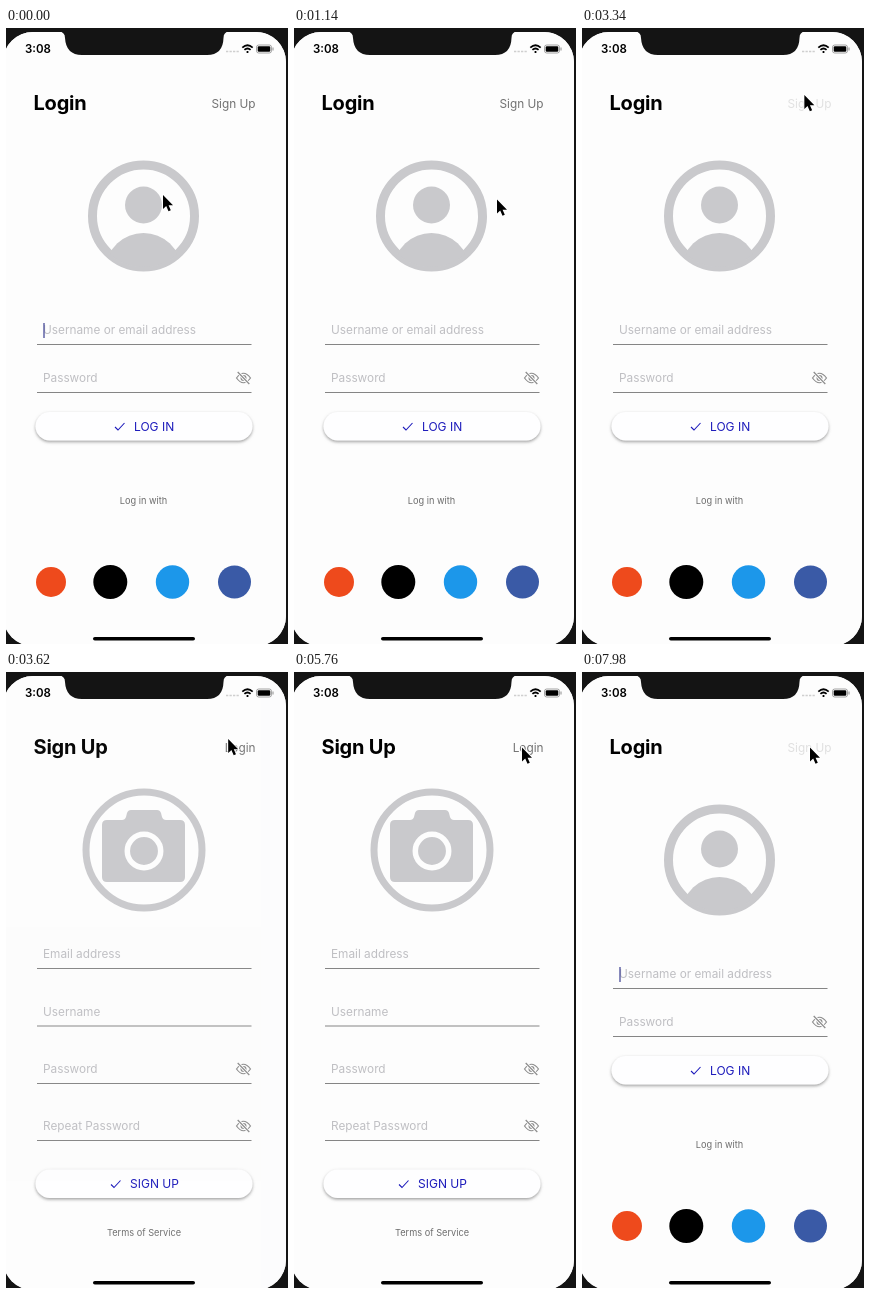
Animation of 282 by 616 pixels, one loop 8 s. Source, as an HTML page:

```html
<!DOCTYPE html>
<html lang="en">
<head>
<meta charset="utf-8">
<title>Login and sign up</title>
<style>
  html, body { margin: 0; width: 100%; height: 100%; overflow: hidden; background: #141414; }
  svg { display: block; width: 282px; height: 616px; font: 11.8px Inter, sans-serif; }
  .title { font-size: 20px; font-weight: 700; letter-spacing: -.2px; fill: #000; }
  .link { fill: #727272; text-anchor: end; }
  .hint { fill: #bfbfc3; }
  .note { font-size: 9.2px; fill: #6c6c6c; text-anchor: middle; }
  .action { font-size: 12px; fill: #1c1abb; }
  .time { font-size: 11.5px; font-weight: 600; }
  .icon { fill: #c9c9cc; }
  .ring { fill: none; stroke: #c9c9cc; }
  .paper { fill: #fdfdfd; }
  .line { fill: none; stroke: #858585; }
  .check { fill: none; stroke: #1c1abb; stroke-width: 1.1; }
</style>
</head>
<body>
<svg viewBox="0 0 282 616">
  <defs>
    <clipPath id="phone"><rect x="-3" y="4" width="283" height="614" rx="30"/></clipPath>
    <clipPath id="portrait"><circle cx="137.5" cy="188" r="51"/></clipPath>
    <filter id="shadow" x="-10%" y="-30%" width="120%" height="170%">
      <feDropShadow dx="0" dy="1.5" stdDeviation="1.5" flood-color="#777" flood-opacity=".7"/>
    </filter>
    <g id="eye" fill="none" stroke="#8c8c8c" stroke-width="1.2">
      <path d="M-7 0Q0-9.5 7 0Q0 9.5-7 0Z"/>
      <circle r="2.4"/>
      <path d="M-5.5-6L5.5 6" stroke="#fdfdfd" stroke-width="3.2"/>
      <path d="M-5.8-6L5.8 6"/>
    </g>
  </defs>
  <g clip-path="url(#phone)">
    <rect width="282" height="616" fill="#efeff0"/>
    <g id="login"></g>
    <g id="signup"></g>
  </g>
  <path d="M53 3.5Q59 4 59 10Q60 27 76 27H201Q217 27 217.5 10Q217.5 4 223 3.5Z" fill="#141414"/>
  <text class="time" x="19" y="25">3:08</text>
  <path d="M220 23.5H233" stroke="#cfcfcf" stroke-width="1.6" stroke-dasharray="2.3 1.2"/>
  <g fill="none" stroke="#000" stroke-width="1.8">
    <path d="M236.3 19.6Q241.5 15 246.7 19.6M238.4 21.9Q241.5 19.2 244.6 21.9"/>
    <path d="M241.5 23V25"/>
  </g>
  <rect x="250.5" y="17" width="15" height="8" rx="2.2" fill="none" stroke="#8c8c8c" stroke-width=".8"/>
  <rect x="251.7" y="18.2" width="12.6" height="5.6" rx="1.2"/>
  <path d="M267 19.5V22.5" stroke="#8c8c8c"/>
  <rect x="87" y="609" width="102" height="3.6" rx="1.8"/>
  <path id="pointer" d="M0 0V14L3.2 11L5.5 16.2L7.8 15.2L5.6 10.2H10Z" stroke="#fff" stroke-width="1.6" paint-order="stroke"/>
</svg>
<script>
const $ = id => document.getElementById(id);

const header = (title, link, id) => `
  <rect class="paper" width="282" height="616"/>
  <text class="title" x="27.5" y="82">${title}</text>
  <text class="link" id="${id}" x="249.5" y="80">${link}</text>`;

const field = (hint, y, secret) => `
  <text class="hint" x="37" y="${y}">${hint}</text>
  <path class="line" d="M31 ${y + 10.5}H245.5"/>
  ${secret ? `<use href="#eye" x="237.5" y="${y - 4}"/>` : ''}`;

const button = (label, y, x) => `
  <rect x="29.5" y="${y}" width="217" height="28.5" rx="14.25" fill="#fefeff" filter="url(#shadow)"/>
  <path class="check" d="M${x - 19} ${y + 15}l3 3l6.5-7"/>
  <text class="action" x="${x}" y="${y + 18.7}">${label}</text>`;

const dot = (x, r, color) => `<circle cx="${x}" cy="554" r="${r}" fill="${color}"/>`;

$('login').innerHTML = header('Login', 'Sign Up', 'toSignup') + `
  <circle class="ring" cx="137.5" cy="188" r="51" stroke-width="9"/>
  <circle class="icon" cx="137.5" cy="177" r="18.5"/>
  <ellipse class="icon" cx="137.5" cy="240" rx="37" ry="35" clip-path="url(#portrait)"/>` +
  field('Username or email address', 306) + field('Password', 354, true) +
  `<path id="caret" d="M38 295V310" stroke="#5558a0" stroke-width="1.4"/>` +
  button('LOG IN', 384, 128) +
  '<text class="note" x="137.5" y="475.5">Log in with</text>' +
  dot(45, 15, '#ee4a1c') + dot(104.3, 17, '#000') + dot(166.5, 16.7, '#1c97ea') + dot(228.5, 16.5, '#3a5aa6');

$('signup').innerHTML = header('Sign Up', 'Login', 'toLogin') + `
  <circle class="ring" cx="138" cy="178" r="58" stroke-width="7"/>
  <path class="icon" d="M101 148H116Q119 148 120 145L121 141Q122 138 125 138H151Q154 138 155 141L156 145Q157 148 160 148H174Q179 148 179 153V205Q179 210 174 210H101Q96 210 96 205V153Q96 148 101 148Z"/>
  <circle class="icon" cx="138" cy="179" r="16.7" stroke="#fdfdfd" stroke-width="5.5"/>` +
  field('Email address', 286) + field('Username', 343.5) +
  field('Password', 401, true) + field('Repeat Password', 458, true) +
  button('SIGN UP', 497.5, 124) +
  '<text class="note" x="138" y="563.5">Terms of Service</text>';

const ramp = (t, from, to) => Math.min(1, Math.max(0, (t - from) / (to - from)));
const ease = p => p * p * (3 - 2 * p);
const press = (t, start) => 1 - 0.8 * ease(ramp(t, start, start + 140));

// The old screen vanishes at once, the new one fades in shortly after.
const toSignupAt = 3470, toLoginAt = 6685;
const appear = (t, from) => 1 - (1 - ramp(t, from + 20, from + 180)) ** 2;

// time, x, y of the pointer tip
const route = [[0, 157, 167], [250, 157, 167], [1050, 203, 171.5], [1240, 203, 171.5],
  [1600, 223, 69], [1900, 223, 67], [4300, 222, 67], [5200, 228, 75.5], [8000, 228, 75.5]];

function pointerAt(t) {
  const i = route.findIndex(stop => stop[0] > t);
  const [t0, x0, y0] = route[i - 1], [t1, x1, y1] = route[i];
  const p = ease(ramp(t, t0, t1));
  return [x0 + (x1 - x0) * p, y0 + (y1 - y0) * p];
}

function draw(now) {
  const t = now % 8000;
  $('login').setAttribute('opacity', t < toSignupAt ? 1 : appear(t, toLoginAt));
  $('signup').setAttribute('opacity', t < toLoginAt ? appear(t, toSignupAt) : 0);
  $('toSignup').setAttribute('opacity', press(t, t < toLoginAt ? 3080 : 7850));
  $('toLogin').setAttribute('opacity', press(t, 6290));
  const blink = t % 1000;
  $('caret').setAttribute('opacity', 1 - ramp(blink, 20, 100) + ramp(blink, 400, 480));
  $('pointer').setAttribute('transform', `translate(${pointerAt(t)})`);
}

const start = performance.now();
function tick() {
  draw(performance.now() - start);
  requestAnimationFrame(tick);
}
tick();
</script>
</body>
</html>
```
